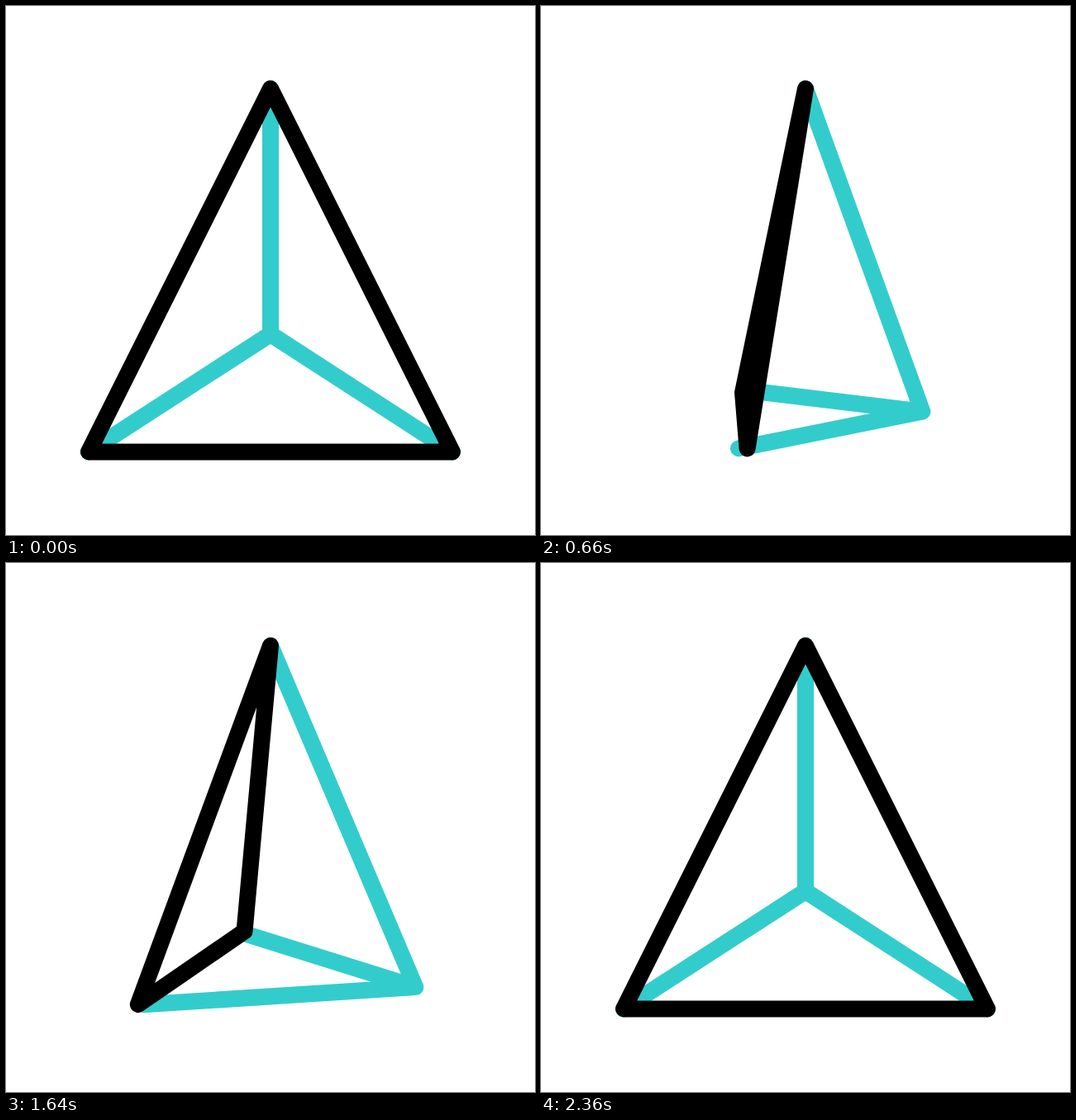
An HTML page for the animation above (2400 ms loop, 640 px wide and 640 px high).

```html
<!DOCTYPE html>
<html>
<head>
<meta charset="utf-8">
<style>
  html, body { margin: 0; height: 100%; overflow: hidden; background: #fff; }
  svg { display: block; width: 100vw; height: 100vh; }
  path { fill: none; stroke-width: 20; stroke-linecap: round; stroke-linejoin: round; }
</style>
</head>
<body>
<svg viewBox="0 0 640 640">
  <path id="star" stroke="#33cccc"/>
  <path id="face" stroke="#000"/>
</svg>
<script>
const LOOP = 2400;
const apex = [320, 100];
// Base corners at rest and after a third of a turn
const left = [[100, 539.4], [318.2, 430.8]];
const right = [[540, 539.4], [100, 533.3]];
const back = [[320, 397], [526.6, 533.8]];
const star = document.getElementById('star');
const face = document.getElementById('face');

// cubic-bezier(.8, 0, .2, 1)
function ease(x) {
  if (x <= 0 || x >= 1) return x <= 0 ? 0 : 1;
  let lo = 0, hi = 1;
  for (let i = 0; i < 30; i++) {
    const s = (lo + hi) / 2, r = 1 - s;
    if (2.4 * r * r * s + 0.6 * r * s * s + s * s * s < x) lo = s; else hi = s;
  }
  return lo * lo * (3 - 2 * lo);
}

// Turn there until `mid`, then back until `end`
const turn = (t, mid, end) =>
  t < mid ? ease(t / mid) : 1 - ease((t - mid) / (end - mid));

const at = ([a, b], p) => a.map((v, i) => v + (b[i] - v) * p);

function draw(now) {
  const t = now % LOOP;
  const p = turn(t, 1217, 2340);
  const q = turn(t, 1233, 2350);
  star.setAttribute('d', `M${apex}L${at(back, p)}L${at(left, p)}M${at(back, p)}L${at(right, p)}`);
  face.setAttribute('d', `M${apex}L${at(left, q)}L${at(right, q)}Z`);
}

const start = performance.now();
function frame() {
  draw(performance.now() - start);
  requestAnimationFrame(frame);
}
frame();
</script>
</body>
</html>
```
